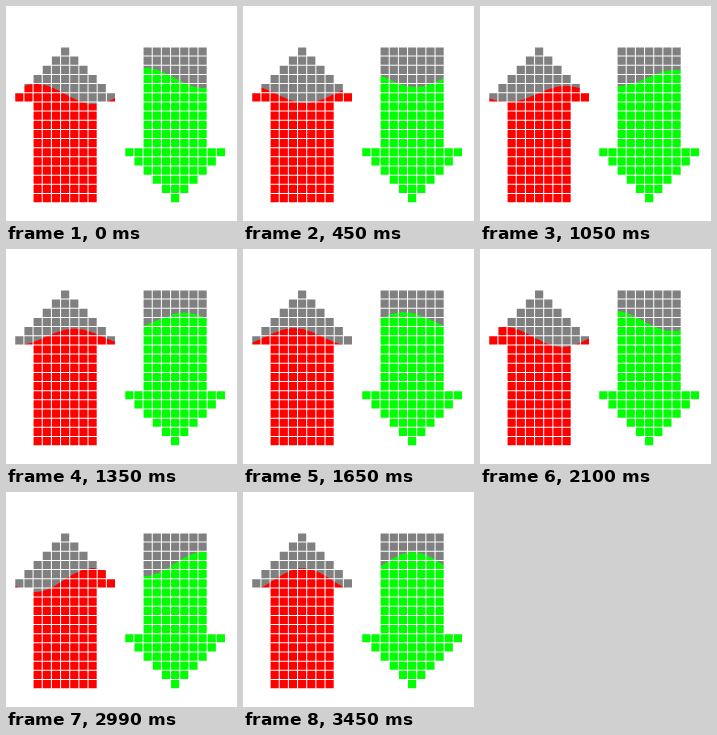
These frames come from a looping animation (231x215 px, 3550 ms). An HTML page with a canvas:

```html
<!DOCTYPE html>
<html lang="en">
<head>
<meta charset="utf-8">
<title>Up and down arrows</title>
<style>
  html, body { margin: 0; width: 100%; height: 100%; overflow: hidden; background: #fff; }
  canvas { display: block; }
</style>
</head>
<body>
<canvas id="stage" width="231" height="215"></canvas>
<script>
const ctx = document.getElementById('stage').getContext('2d');
const LOOP = 3550, PITCH = 9.16, CELL = PITCH - 1, TOP = 41.45, ROWS = 17, COLS = 11;
const WAVELENGTH = 116;

// Start of each step: every 150 ms, a few near the end 10 ms early
const starts = Array.from({ length: 24 }, (_, k) => 150 * k - (k > 18 && k < 23 ? 10 : 0));

const headWidth = row => row < 6 ? 2 * row + 1 : 7;
const arrows = [
  { left: 9.25, level: 88, color: '#f00', rowWidth: headWidth },
  { left: 119.25, level: 72, color: '#0f0', rowWidth: row => headWidth(ROWS - 1 - row) }
];

const cells = new Path2D();
for (const { left, rowWidth } of arrows) {
  for (let row = 0; row < ROWS; row++) {
    const first = (COLS - rowWidth(row)) / 2;
    for (let col = first; col < COLS - first; col++) {
      cells.rect(left + PITCH * col, TOP + PITCH * row, CELL, CELL);
    }
  }
}

function drawLiquid({ left, level, color }, step) {
  // The wave drifts left, slightly faster with time, while its height swells
  const trough = left + 78.75 - 8.5 * step - 0.0125 * step * step;
  const height = 10 - 2 * Math.cos(Math.PI * (step - 7) / 14);
  const right = left + COLS * PITCH;
  ctx.fillStyle = '#808080';
  ctx.fillRect(left - 1, 0, right - left + 1, 215);
  ctx.beginPath();
  ctx.moveTo(left - 1, 215);
  for (let x = left - 1; x <= right; x++) {
    ctx.lineTo(x, level + height * Math.cos(2 * Math.PI * (x - trough) / WAVELENGTH));
  }
  ctx.lineTo(right, 215);
  ctx.fillStyle = color;
  ctx.fill();
}

function draw() {
  const time = performance.now() % LOOP;
  const step = starts.filter(start => start <= time).length - 1;
  ctx.globalCompositeOperation = 'source-over';
  ctx.clearRect(0, 0, 231, 215);
  for (const arrow of arrows) drawLiquid(arrow, step);
  // Keep only what lies inside the cells
  ctx.globalCompositeOperation = 'destination-in';
  ctx.fill(cells);
  requestAnimationFrame(draw);
}
draw();
</script>
</body>
</html>
```
